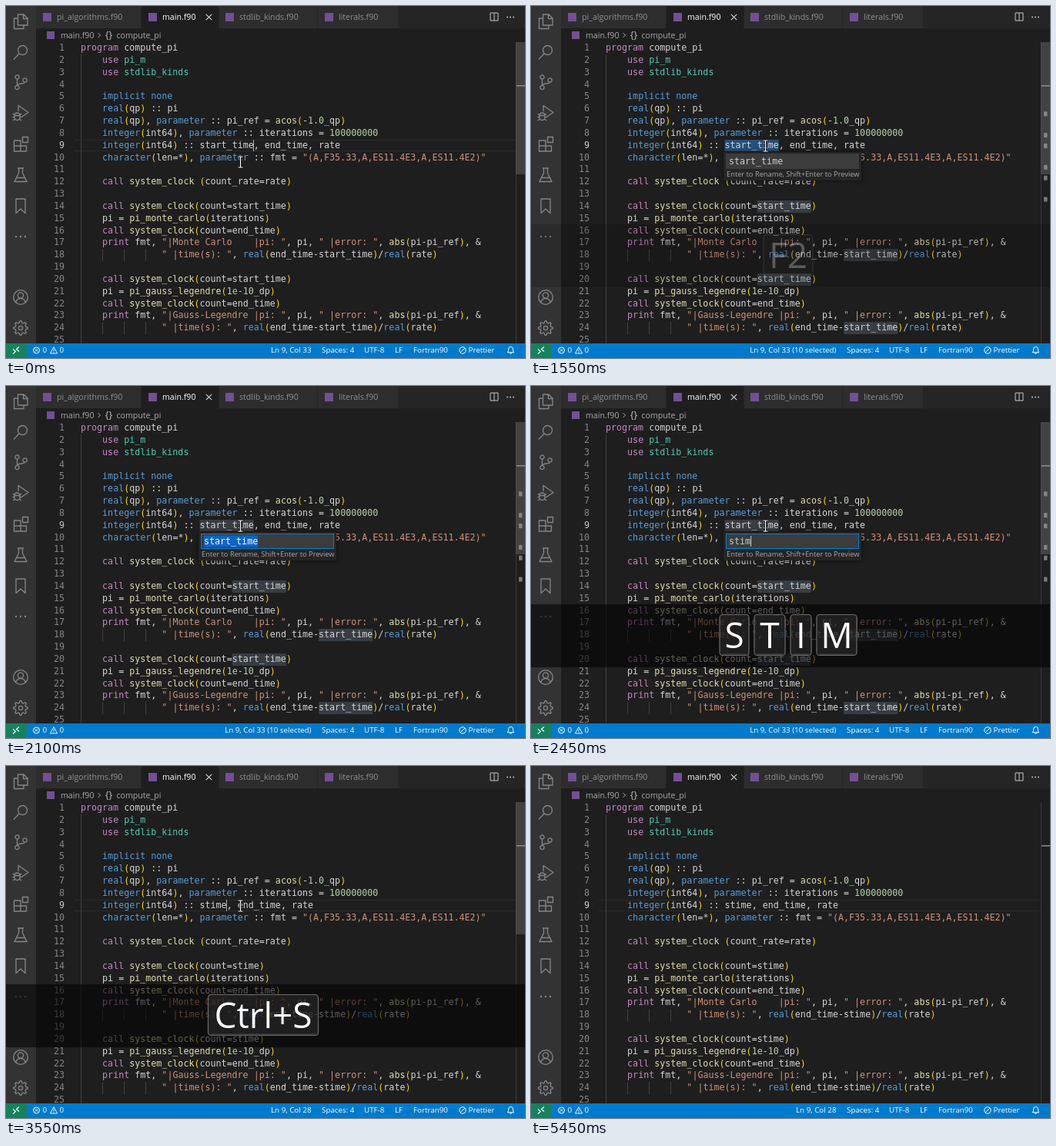
Animation, 674 px wide and 458 px high, one loop 5500 ms. Source, as an HTML page with a canvas:

```html
<!DOCTYPE html>
<html lang="en">
<head>
<meta charset="utf-8">
<title>Rename symbol</title>
<style>
html, body { margin: 0; width: 100%; height: 100%; overflow: hidden; background: #1e1e1e; }
canvas { display: block; width: 674px; height: 458px; }
</style>
</head>
<body>
<canvas id="stage"></canvas>
<script>
const W = 674, H = 458, LOOP = 5500;
const canvas = document.getElementById('stage');
const ctx = canvas.getContext('2d');
const dpr = window.devicePixelRatio || 1;
canvas.width = W * dpr;
canvas.height = H * dpr;

const MONO = '11.667px "DejaVu Sans Mono", monospace';
const UI = '10.6px "Open Sans", sans-serif';
const STATUS = '9.8px "Open Sans", sans-serif';
const HINT = '9.3px "Open Sans", sans-serif';
const KEY = '46px "Open Sans", sans-serif';
const CHAR = 7.024, LEFT = 97, TOP = 46.85, LINE = 95 / 6;

const CODE = `program compute_pi
    use pi_m
    use stdlib_kinds

    implicit none
    real(qp) :: pi
    real(qp), parameter :: pi_ref = acos(-1.0_qp)
    integer(int64), parameter :: iterations = 100000000
    integer(int64) :: start_time, end_time, rate
    character(len=*), parameter :: fmt = "(A,F35.33,A,ES11.4E3,A,ES11.4E2)"

    call system_clock (count_rate=rate)

    call system_clock(count=start_time)
    pi = pi_monte_carlo(iterations)
    call system_clock(count=end_time)
    print fmt, "|Monte Carlo    |pi: ", pi, " |error: ", abs(pi-pi_ref), &
               " |time(s): ", real(end_time-start_time)/real(rate)

    call system_clock(count=start_time)
    pi = pi_gauss_legendre(1e-10_dp)
    call system_clock(count=end_time)
    print fmt, "|Gauss-Legendre |pi: ", pi, " |error: ", abs(pi-pi_ref), &
               " |time(s): ", real(end_time-start_time)/real(rate)
`;

const RULES = [
  [/^"[^"]*"/, '#ce9178'],
  [/^(program|use|call|print)\b/, '#c586c0'],
  [/^(implicit|none|real|integer|character|parameter)\b/, '#569cd6'],
  [/^(pi_m|stdlib_kinds)\b/, '#4ec9b0'],
  [/^[a-z]\w*(?= ?\()/, '#dcdcaa'],
  [/^\d+(\.\d+)?(e-\d+)?/, '#b5cea8'],
  [/^[()]/, '#ffd700'],
  [/^\w+/, '#d4d4d4'],
  [/^[^\w"()]+/, '#d4d4d4']
];

function tokenize(line) {
  const out = [];
  let col = 0;
  while (col < line.length) {
    const rest = line.slice(col);
    const [re, color] = RULES.find(r => r[0].test(rest));
    const str = re.exec(rest)[0];
    out.push({ str, color, col });
    col += str.length;
  }
  return out;
}

const before = CODE.split('\n').map(tokenize);
const after = CODE.replace(/start_time/g, 'stime').split('\n').map(tokenize);

// Lines and baselines snap to whole pixels
const colX = col => LEFT + (col - 1) * CHAR;
const lineY = n => Math.round(TOP + (n - 1) * LINE);
const baseY = n => Math.round(TOP + 11.23 + (n - 1) * LINE);
const clamp = v => Math.max(0, Math.min(1, v));
const within = (t, a, b) => t >= a && t < b;

function rect(x, y, w, h, color) {
  ctx.fillStyle = color;
  ctx.fillRect(x, y, w, h);
}

function text(str, x, y, font, color, align = 'left') {
  ctx.font = font;
  ctx.fillStyle = color;
  ctx.textAlign = align;
  ctx.fillText(str, x, y);
}

function disc(x, y, r, color) {
  ctx.fillStyle = color;
  ctx.beginPath();
  ctx.arc(x, y, r, 0, 7);
  ctx.fill();
}

function icon(x, y, d, color, width = 1.2) {
  ctx.save();
  ctx.translate(x, y);
  ctx.strokeStyle = color;
  ctx.lineWidth = width;
  ctx.lineJoin = 'round';
  ctx.stroke(new Path2D(d));
  ctx.restore();
}

const ring = (x, y, r) => `M${x + r} ${y}a${r} ${r} 0 1 0 ${-2 * r} 0a${r} ${r} 0 1 0 ${2 * r} 0`;

// Outline of a cog with eight teeth
function cog() {
  let d = '';
  for (let i = 0; i < 32; i++) {
    const a = (i - 0.5) * Math.PI / 16;
    const r = i % 4 < 2 ? 9.3 : 6.8;
    d += `${i ? 'L' : 'M'}${(r * Math.cos(a)).toFixed(2)} ${(r * Math.sin(a)).toFixed(2)}`;
  }
  return d + 'Z' + ring(0, 0, 2.6);
}

const SIDE = [
  [20, 'M-3.5 -9H4L9 -4V5H-3.5ZM3.5 -9V-3.5H9M-3.5 -4H-8.5V9.5H4V5'],
  [60, ring(2.5, -2.5, 6) + 'M-2 2L-9 9.5'],
  [99, ring(-4.5, -6.5, 2.6) + ring(-4.5, 7, 2.6) + ring(5.5, -2.5, 2.6) + 'M-4.5 -4V4.5M5.5 0C5.5 3-4.5 1-4.5 4.5'],
  [139, 'M-3 -2V-9.5L10 -0.5L1 5.5M-8 3.5A3.5 3.5 0 0 1 -1 3.5V6A3.5 3.5 0 0 1 -8 6ZM-8 3.5H-1M-10 1L-8 3M1 1L-1 3M-10.5 5.5H-8M1.5 5.5H-1M-10 10L-7.5 8M1 10L-1.5 8'],
  [180, 'M-8.5 -5H0V9H-8.5ZM-8.5 2H7.5V9H0M2.5 -9.5H9.5V-2.5H2.5Z'],
  [220, 'M-4 -9H4M-2.5 -9V-2.5L-8 8.5H8L2.5 -2.5V-9M-5.3 3.5H5.3'],
  [260, 'M-6 -9H6V9.5L0 4L-6 9.5Z'],
  [379, ring(0, 0, 9.3) + ring(0, -2.5, 3.6) + 'M-6 7A6 5.5 0 0 1 6 7'],
  [419, cog()]
];

function drawFrame(t) {
  rect(0, 0, W, H, '#1e1e1e');
  rect(0, 0, 39, 440, '#333333');
  for (const [y, d] of SIDE) icon(19, y, d, '#858585', 1.35);
  for (const dx of [-6, 0, 6]) disc(19 + dx, 300, 1.2, '#858585');
  const dirty = within(t, 2800, 3300);
  if (dirty) {
    disc(26, 27, 6.5, '#007acc');
    text('1', 26, 29.8, 'bold 7.5px "Open Sans", sans-serif', '#fff', 'center');
  }

  rect(39, 0, W - 39, 29, '#252526');
  const tabs = [
    [39, 175, 'pi_algorithms.f90', 66],
    [176, 276, 'main.f90', 203],
    [277, 404, 'stdlib_kinds.f90', 303],
    [405, 509, 'literals.f90', 432]
  ];
  tabs.forEach(([x, end, name, tx], i) => {
    const active = i === 1;
    rect(x, 0, end - x, 29, active ? '#1e1e1e' : '#2d2d2d');
    rect(tx - 18, 9, 11, 11, '#734f96');
    text(name, tx, 18, UI, active ? '#ffffff' : '#8f8f8f');
  });
  if (dirty) disc(263.5, 14.5, 3.6, '#ffffff');
  else icon(263.5, 14.5, 'M-3.7 -3.7L3.7 3.7M3.7 -3.7L-3.7 3.7', '#d8d8d8', 1.1);
  icon(634, 14, 'M-5 -5H5V5H-5ZM0 -5V5', '#c5c5c5', 1);
  for (const dx of [-4, 0, 4]) disc(655 + dx, 14.5, 0.95, '#c5c5c5');

  rect(53, 33, 10, 10, '#734f96');
  text('main.f90', 71, 42, UI, '#a9a9a9');
  icon(121, 38, 'M-1.5 -3L1.5 0L-1.5 3', '#a9a9a9', 1);
  text('{}', 133.5, 42, '12.5px "Open Sans", sans-serif', '#c5c5c5', 'center');
  text('compute_pi', 143.5, 42, UI, '#a9a9a9');
}

function drawEditor(t) {
  const renamed = t >= 2800;
  const selected = within(t, 800, 2800);
  const mark = (n, col, color) => rect(colX(col), lineY(n), 10 * CHAR, lineY(n + 1) - lineY(n), color);
  ctx.save();
  ctx.beginPath();
  ctx.rect(39, 46, W - 39, 393);
  ctx.clip();

  if (!selected) {
    rect(88, lineY(9), 574, 1, '#2b2b2b');
    rect(88, lineY(10) - 1, 574, 1, '#2b2b2b');
  }
  rect(LEFT, lineY(2), 1, 24 * LINE, '#404040');
  for (const n of [18, 24])
    for (const col of [5, 9, 13]) rect(Math.floor(colX(col)), lineY(n), 1, 16, '#404040');

  if (selected) {
    mark(9, 23, t < 1600 ? '#264f78' : '#3a3d41');
    if (t >= 850)
      for (const [n, col] of [[14, 29], [18, 45], [20, 29], [24, 45]]) mark(n, col, '#373d42');
  }

  (renamed ? after : before).forEach((tokens, i) => {
    const y = baseY(i + 1);
    text(i + 1, 76, y, MONO, i === 8 ? '#c6c6c6' : '#858585', 'right');
    for (const tok of tokens)
      if (tok.str.trim()) text(tok.str, colX(tok.col + 1), y, MONO, tok.color);
  });

  const blink = [[0, 300], [650, 1250], [2800, 3200], [3550, 3950], [4300, 4700], [5050, 5450]];
  if (blink.some(([a, b]) => within(t, a, b)))
    rect(Math.floor(colX(caretCol(t))), lineY(9), 1, 15, '#aeafad');
  ctx.restore();

  rect(662, 47, 1, 392, '#393939');
  const slider = 1 - clamp((t - 4500) / 200);
  rect(662, 47, 12, 172, `rgba(121,121,121,${0.4 * slider})`);
  if (within(t, 850, 2800))
    for (const n of [14, 18, 20, 24, 26, 30]) rect(666, 47 + (n - 1) * 6.95, 4.5, 6, 'rgba(160,160,160,.7)');
  rect(663, 103, 11, 1.6, '#8a8a8a');
}

function caretCol(t) {
  if (t >= 2800) return 28;
  return within(t, 650, 800) ? 30 : 33;
}

const PRESSES = [['S', 2150], ['T', 2250], ['I', 2300], ['M', 2400], ['E', 2600], ['Enter', 2700]];
const KEY_W = { S: 39, T: 41, I: 28, M: 53, E: 41, Enter: 131, F2: 65, 'Ctrl+S': 144 };

function drawRename(t) {
  if (!within(t, 1550, 2800)) return;
  ctx.save();
  ctx.shadowColor = 'rgba(0,0,0,.55)';
  ctx.shadowBlur = 6;
  rect(250, 190, 179, 37, '#252526');
  ctx.restore();
  rect(253, 192, 173, 20, '#3c3c3c');
  const focus = t >= 1600;
  if (focus) {
    ctx.strokeStyle = '#007fd4';
    ctx.lineWidth = 1;
    ctx.strokeRect(253.5, 192.5, 172, 19);
  }
  const typed = PRESSES.filter(([k, at]) => k.length === 1 && t >= at).map(p => p[0]).join('').toLowerCase();
  if (focus && !typed) rect(257, 194.5, 10 * CHAR, 15, '#0a64c8');
  text(typed || 'start_time', 257, 206, MONO, focus && !typed ? '#ffffff' : '#cccccc');
  if (typed) rect(257 + typed.length * CHAR, 195, 1, 14, '#cccccc');
  text('Enter to Rename, Shift+Enter to Preview', 254, 222, HINT, '#a8a8a8');
}

function drawStatus(t) {
  rect(0, 439, W, 19, '#007acc');
  rect(0, 439, 27, 19, '#16825d');
  icon(13, 448, 'M-4 -1.5L-0.5 1.5L-4 4.5M4 -4.5L0.5 -1.5L4 1.5', '#fff', 1.1);
  icon(39.5, 448, ring(0, 0, 4) + 'M-1.8 -1.8L1.8 1.8M1.8 -1.8L-1.8 1.8', '#fff', 1);
  icon(62, 448, 'M0 -4.3L4.6 4H-4.6ZM0 -1.5V1.5M0 2.3V3.2', '#fff', 0.9);
  const label = (s, x, align) => text(s, x, 451, STATUS, '#ffffff', align);
  label('0', 47.5);
  label('0', 69.5);
  label(`Ln 9, Col ${caretCol(t)}${within(t, 800, 2800) ? ' (10 selected)' : ''}`, 396.5, 'right');
  label('Spaces: 4', 410);
  label('UTF-8', 465);
  label('LF', 505);
  label('Fortran90', 529);
  icon(593, 448, ring(0, 0, 4.2) + 'M-2.9 2.9L2.9 -2.9', '#fff', 1);
  label('Prettier', 600.5);
  icon(655.5, 448, 'M-4.2 2.8H4.2L3 0.8V-1.5A3 3 0 0 0 -3 -1.5V0.8ZM-1.2 3.2A1.2 1.2 0 0 0 1.2 3.2', '#fff', 1);
}

function drawPointer(t) {
  if (t >= 4250) return;
  const p = clamp((t - 50) / 550);
  const y = 203 - 21 * p * p * (3 - 2 * p);
  const beam = 'M-3 -7H-1Q0 -7 0 -6V6Q0 7 -1 7H-3M3 -7H1Q0 -7 0 -6M0 6Q0 7 1 7H3';
  icon(304.5, y, beam, '#000000', 2.6);
  icon(304.5, y, beam, '#ffffff', 1.2);
}

function drawKeys(t) {
  let keys, start;
  if (within(t, 1550, 2100)) {
    keys = ['F2'];
    start = 1550;
  } else if (within(t, 2150, 3200)) {
    keys = PRESSES.filter(p => t >= p[1]).map(p => p[0]);
    start = 2150;
  } else if (within(t, 3200, 3850)) {
    keys = ['Ctrl+S'];
    start = 0;
  } else return;

  ctx.save();
  ctx.globalAlpha = clamp(0.28 + 0.72 * (t - start) / 250);
  rect(0, 284, W, 82, 'rgba(0,0,0,.57)');
  const total = keys.reduce((sum, k) => sum + KEY_W[k] + 6, -6);
  let x = 334 - total / 2;
  for (const k of keys) {
    const w = KEY_W[k];
    ctx.beginPath();
    ctx.roundRect(x + 0.5, 297.5, w - 1, 53, 4);
    ctx.fillStyle = 'rgba(45,45,45,.55)';
    ctx.fill();
    ctx.strokeStyle = '#6c6c6c';
    ctx.lineWidth = 1.2;
    ctx.stroke();
    rect(x + 4, 348.5, w - 8, 1, 'rgba(120,120,120,.5)');
    text(k, x + w / 2, 341, KEY, '#ffffff', 'center');
    x += w + 6;
  }
  ctx.restore();
}

function draw(now) {
  const t = Math.floor((now % LOOP) / 50) * 50;
  ctx.setTransform(dpr, 0, 0, dpr, 0, 0);
  drawFrame(t);
  drawEditor(t);
  drawRename(t);
  drawStatus(t);
  drawPointer(t);
  drawKeys(t);
}

let origin;
function tick(now) {
  if (origin === undefined) origin = now;
  draw(Math.max(0, now - origin));
  requestAnimationFrame(tick);
}
draw(0);
requestAnimationFrame(tick);
</script>
</body>
</html>
```
